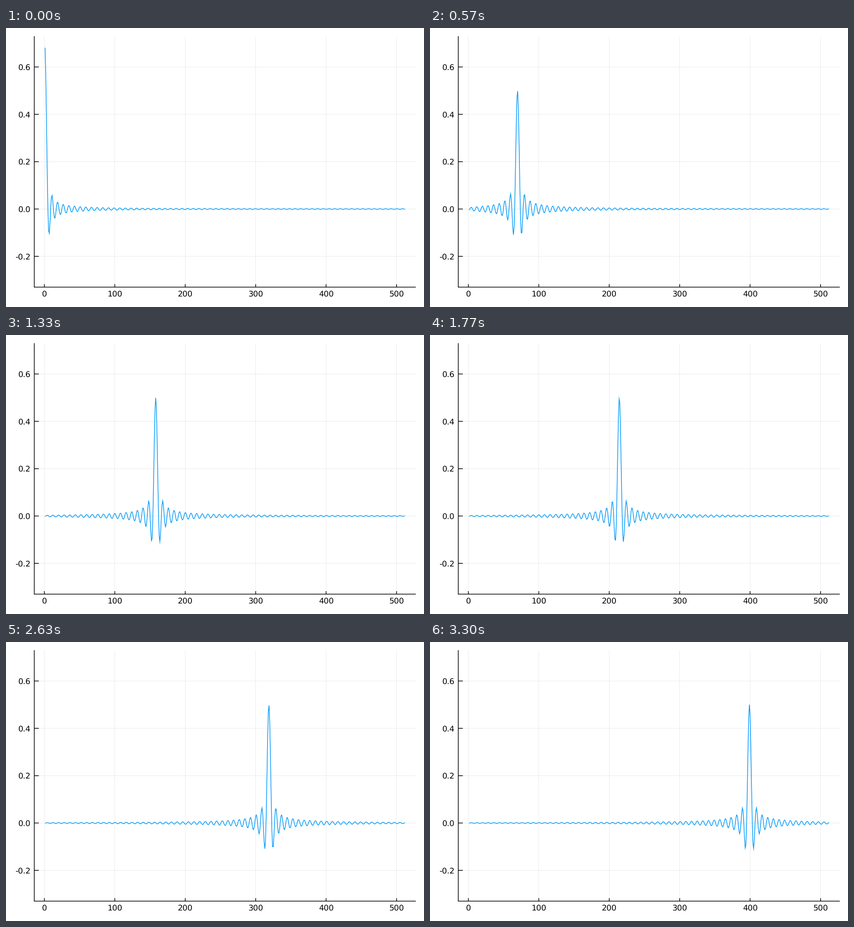
A matplotlib script that plays this animation: 917 by 611 pixels, repeating every 3330 ms.

```python
import numpy as np
import matplotlib.pyplot as plt
from matplotlib.animation import FuncAnimation
from matplotlib.collections import PolyCollection

W, H, DPI = 917, 611, 128
N, K, FRAMES = 512, 128, 100
LEFT, RIGHT, TOP, BOTTOM = 62, 899, 18, 567.5
X_MIN, X_MAX, Y_MIN, Y_MAX = -14.33, 527.33, -0.33, 0.73
BLUE = "#009afa"
STROKE = 1.5

plt.rcParams["font.family"] = "DejaVu Sans"
plt.rcParams["text.hinting"] = "none"
plt.rcParams["path.simplify"] = False


def pt(pixels):
    return pixels * 72 / DPI


def px(x):
    return LEFT + (x - X_MIN) / (X_MAX - X_MIN) * (RIGHT - LEFT)


def py(y):
    return TOP + (Y_MAX - y) / (Y_MAX - Y_MIN) * (BOTTOM - TOP)


def polar(m):
    """Nearest orthogonal matrix."""
    u, _, vt = np.linalg.svd(m)
    return u @ vt


def cosines(x):
    """Lowest K cosine modes of a path of N nodes, sampled at x."""
    modes = np.cos(np.pi * np.outer(x - 0.5, np.arange(K)) / N) * np.sqrt(2 / N)
    modes[:, 0] /= np.sqrt(2)
    return modes


def localized_waves(steps=100):
    """Varimax rotation of the low modes, ordered by position."""
    spacing = 2 * N / (2 * K - 1)
    centers = 0.5 + spacing * (np.arange(K) + 0.25)
    basis = cosines(np.arange(1, N + 1))
    rotation = polar(cosines(centers).T)
    for _ in range(steps):
        rotation = polar(basis.T @ (basis @ rotation) ** 3)
    return basis @ rotation


def miter_tips(points):
    """Triangles that complete the sharp corners of the stroke."""
    d = np.diff(points, axis=0)
    d /= np.hypot(d[:, 0], d[:, 1])[:, None]
    n = np.column_stack([-d[:, 1], d[:, 0]])
    n1, n2 = n[:-1], n[1:]
    cross = d[:-1, 0] * d[1:, 1] - d[:-1, 1] * d[1:, 0]
    side = -np.sign(cross)[:, None] * STROKE / 2
    miter = (n1 + n2) / (1 + np.sum(n1 * n2, axis=1) + 1e-9)[:, None]
    ratio = np.hypot(miter[:, 0], miter[:, 1])
    p = points[1:-1]
    tips = np.stack([p + side * n1, p + side * miter, p + side * n2], axis=1)
    return tips[(ratio > 4) & (ratio <= 10)]


fig = plt.figure(figsize=(W / DPI, H / DPI), dpi=DPI, facecolor="white")
ax = fig.add_axes([0, 0, 1, 1])
ax.set(xlim=(0, W), ylim=(H, 0))
ax.axis("off")


def rule(xs, ys, width, **style):
    ax.plot(xs, ys, color="black", lw=pt(width), snap=False,
            solid_capstyle="butt", **style)


def label(x, y, text, ha):
    ax.text(x, y, text, ha=ha, va="baseline", fontsize=pt(17.2), color="black")


for value in range(0, 501, 100):
    x = px(value)
    rule([x, x], [TOP, BOTTOM], 0.8, alpha=0.1)
    rule([x, x], [BOTTOM, BOTTOM - 6.5], STROKE)
    label(x, 588.2, str(value), "center")

for value in (-0.2, 0.0, 0.2, 0.4, 0.6):
    y = py(value)
    rule([LEFT, RIGHT], [y, y], 0.8, alpha=0.1)
    rule([LEFT, LEFT + 10], [y, y], STROKE)
    label(54, y + 6.3, f"{value:.1f}", "right")

rule([LEFT, LEFT], [TOP, BOTTOM + STROKE / 2], STROKE)
rule([LEFT, RIGHT], [BOTTOM, BOTTOM], STROKE)

waves = localized_waves()
xs = px(np.arange(1, N + 1))
curve, = ax.plot([], [], color=BLUE, lw=pt(STROKE), snap=False, zorder=3,
                 solid_joinstyle="miter", solid_capstyle="butt")
corners = PolyCollection([], facecolors=BLUE, edgecolors="none", zorder=3)
ax.add_collection(corners, autolim=False)


def draw(frame):
    ys = py(waves[:, frame])
    curve.set_data(xs, ys)
    corners.set_verts(miter_tips(np.column_stack([xs, ys])))
    return curve, corners


anim = FuncAnimation(fig, draw, frames=FRAMES, interval=33.3,
                     init_func=lambda: draw(0), repeat=True, repeat_delay=0)
plt.show()
```
